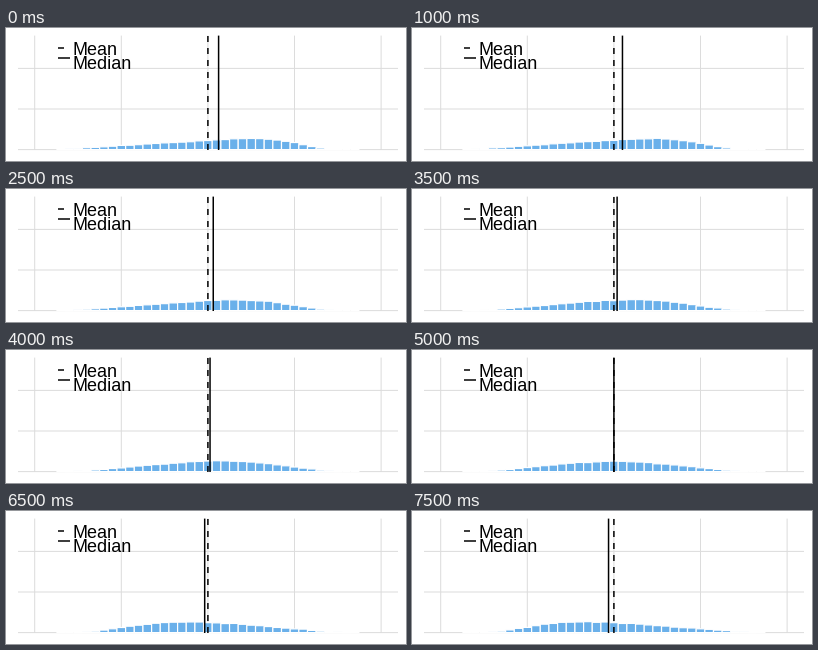
A matplotlib script for the animation above (8000 ms loop, 400x133 px).

```python
import numpy as np
import matplotlib.pyplot as plt
from matplotlib.animation import FuncAnimation

W, H, DPI = 400, 133, 100
PT = 72 / DPI                      # points per pixel
FRAMES, STEP = 16, 500
BALANCED = 10                      # step at which the skew passes zero
MID, UNIT = 201.9, 86.6            # pixel of the mean, pixels per x unit
BIN = UNIT / 10
LEFT, RIGHT, TOP, BASE = 12, 392, 7.6, 121.6
GRID, BLUE = "#dcdcdc", "#6ab0ea"

bins = np.arange(-17, 18)


def bump(skew):
    """Bell with a long, nearly straight tail opposite to the skew."""
    k = abs(skew) ** 0.7
    x = bins * (1 if skew >= 0 else -1) - 5 * k
    tail = x < 0
    u = np.abs(x) / np.where(tail, 15.7 + 6.3 * k, 15.7 - 6.2 * k)
    q = np.where(tail, 2 - 0.8 * k, 2 + 0.3 * k)
    p = np.where(tail, 2 - 0.9 * k, 2)
    return (10 + 0.7 * k) * (1 - np.minimum(u, 1) ** q) ** p


def heights(i):
    h = bump(1 - i / BALANCED)
    noise = np.random.default_rng(40 + i).normal(0, 0.08, bins.size)
    h = np.maximum(h + noise * np.sqrt(h), 0)
    return h + 0.4 * (h > 0.2)


def median_x(i):
    return MID + 1.07 * (BALANCED - i)


fig = plt.figure(figsize=(W / DPI, H / DPI), dpi=DPI, facecolor="white")
ax = fig.add_axes([0, 0, 1, 1])
ax.set(xlim=(0, W), ylim=(H, 0))
ax.axis("off")


def line(xs, ys, color="black", width=1.5, **kw):
    return ax.plot(xs, ys, color=color, lw=width * PT, snap=False,
                   solid_capstyle="butt", dash_capstyle="butt", **kw)[0]


DASH = dict(linestyle=(0, (4, 4)))

for y in np.linspace(BASE, 40.4, 3):
    line([LEFT, RIGHT], [y, y], GRID, 1, zorder=1)
for k in range(-2, 3):
    x = MID + k * UNIT
    line([x, x], [TOP, BASE + 0.4], GRID, 1, zorder=1)

bars = ax.bar(MID + bins * BIN, np.zeros(bins.size), BIN, bottom=BASE,
              color=BLUE, edgecolor="white", linewidth=1.2 * PT,
              snap=False, zorder=2)
line([MID, MID], [BASE + 0.4, TOP], zorder=3, **DASH)
median = line([MID, MID], [TOP, BASE + 0.4], zorder=4)

line([52, 64], [20, 20], zorder=5, **DASH)
line([52, 64], [30, 30], zorder=5)
for label, y in (("Mean", 27), ("Median", 41)):
    ax.text(66.6, y, label, family="Liberation Sans", size=18 * PT,
            color="black", va="baseline", zorder=5)


def draw(i):
    for bar, h in zip(bars, heights(i)):
        bar.set_height(-h)
    x = median_x(i)
    median.set_xdata([x, x])
    return [*bars, median]


anim = FuncAnimation(fig, draw, frames=FRAMES, interval=STEP,
                     repeat=True, repeat_delay=0)
plt.show()
```
